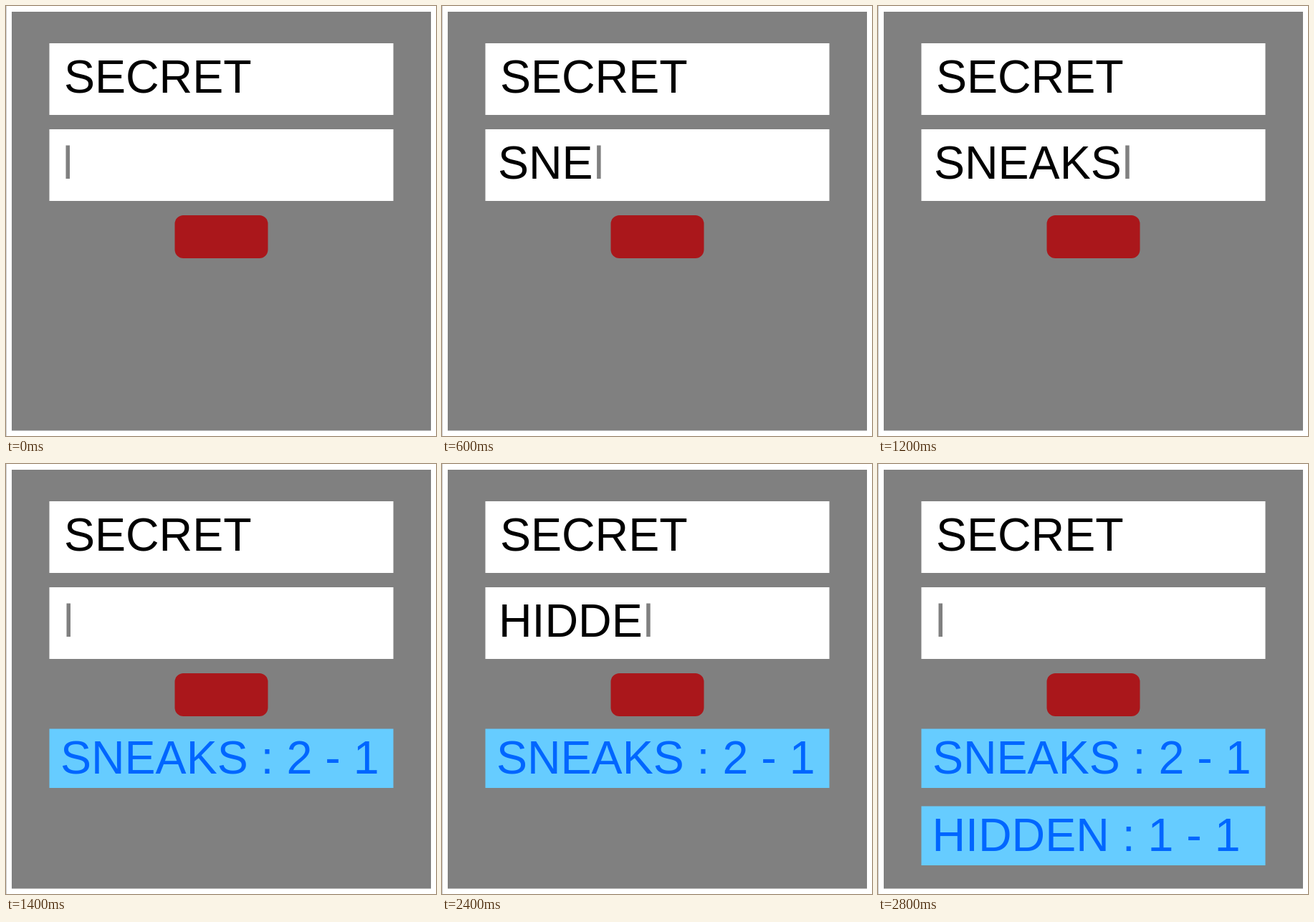
An HTML page that plays this animation: 600x600 px, repeating every 3200 ms.

```html
<!DOCTYPE html>
<html lang="en">
<head>
<meta charset="utf-8">
<title>Guessing game</title>
<style>
  html, body { margin: 0; width: 100%; height: 100%; overflow: hidden; background: #fff; }
  svg { display: block; width: 100%; height: 100%; }
  text { font: 64.5px "Liberation Sans", Arial, sans-serif; font-kerning: none; }
  .field { fill: #fff; }
  .result rect { fill: #6cf; }
  .result text { fill: #06f; }
</style>
</head>
<body>
<svg viewBox="0 0 600 600">
  <rect width="1" height="600" fill="#ccc"/>
  <rect x="8" y="8" width="585" height="584.5" fill="#808080"/>

  <rect class="field" x="60.5" y="52" width="480" height="100"/>
  <text x="81" y="121">SECRET</text>

  <rect class="field" x="60.5" y="172" width="480" height="100"/>
  <text id="typed" y="241"></text>
  <rect id="caret" y="194.5" width="5.5" height="46.5" fill="#808080"/>

  <rect x="235.5" y="292" width="130" height="60" rx="12" fill="#aa171b"/>

  <g class="result">
    <rect x="60.5" y="369.5" width="480" height="82.5"/>
    <text x="76" y="432">SNEAKS : 2 - 1</text>
  </g>
  <g class="result">
    <rect x="60.5" y="477.5" width="480" height="82.5"/>
    <text x="75.5" y="540">HIDDEN : 1 - 1</text>
  </g>
</svg>
<script>
  const LOOP = 3200, STEP = 200, CARET_GAP = 5.5;
  const guesses = ["SNEAKS", "HIDDEN"];
  const stepsPerGuess = guesses[0].length + 1; // empty field, then one letter per step

  const typed = document.getElementById("typed");
  const caret = document.getElementById("caret");
  const results = document.querySelectorAll(".result");
  let shownStep = -1;

  function draw(step) {
    const done = Math.floor(step / stepsPerGuess);
    const text = (guesses[done] || "").slice(0, step % stepsPerGuess);
    const left = done ? 79 : 78;

    typed.textContent = text;
    typed.setAttribute("x", left);
    const width = text ? typed.getComputedTextLength() : 0;
    caret.setAttribute("x", left + width + CARET_GAP);
    results.forEach((row, i) => row.style.display = i < done ? "" : "none");
  }

  function tick() {
    const time = performance.now() % LOOP;
    const step = Math.min(Math.floor(time / STEP), guesses.length * stepsPerGuess);
    if (step !== shownStep) draw(shownStep = step);
    requestAnimationFrame(tick);
  }
  tick();
</script>
</body>
</html>
```
